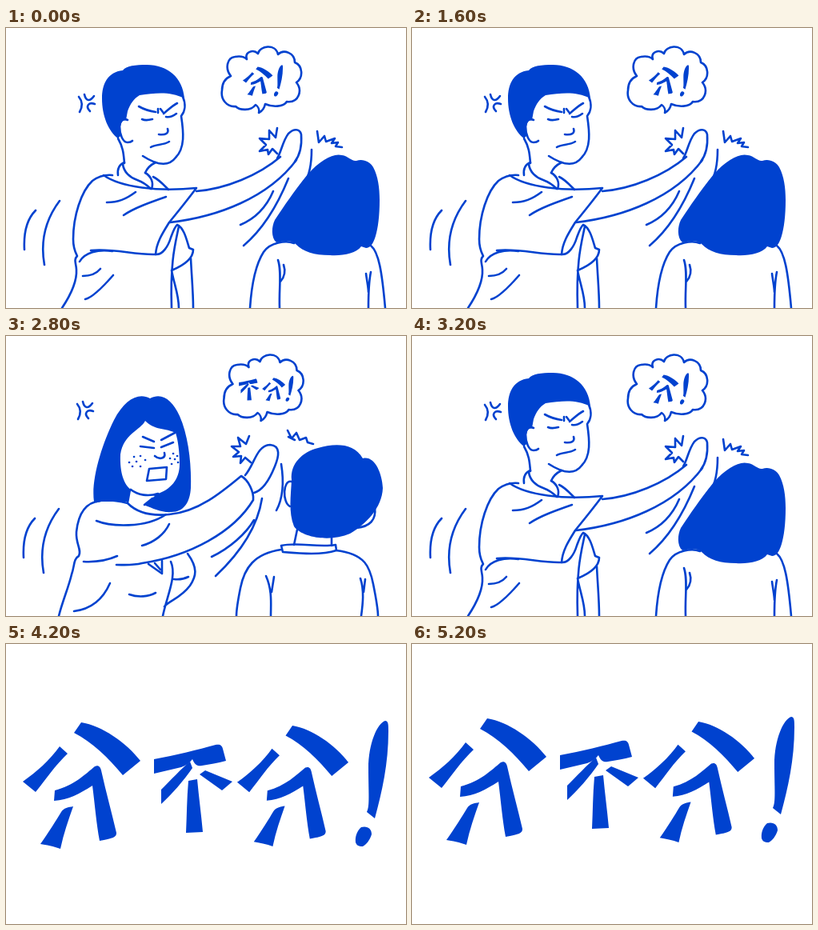
Animation of 500 by 350 pixels, one loop 8.2 s. Source, as an HTML page:

```html
<!DOCTYPE html>
<html lang="zh">
<head>
<meta charset="utf-8">
<title>分不分!</title>
<style>
  html, body { margin: 0; width: 100%; height: 100%; overflow: hidden; background: #fff; }
  svg { display: block; width: 100vw; height: 100vh; }
  .line { fill: none; stroke: #0042cf; stroke-width: 2.6; stroke-linecap: round; stroke-linejoin: round; }
  .ink { fill: #0042cf; stroke: none; }
  .paper { fill: #fff; stroke: none; }
  #woman, #title { opacity: 0; }
  #title { transform-origin: 249.5px 171px; }
</style>
</head>
<body>
<svg viewBox="0 0 500 350" role="img" aria-label="分不分!">
  <defs>
    <g id="fen" class="ink">
      <path d="M94 93C120 97 150 118 168 141L146 159C128 137 108 118 85 106Z"/>
      <path d="M67 123L77 132C62 146 50 164 37 180L21 167C38 155 55 140 67 123Z"/>
      <path d="M61 178C85 172 100 157 111 148C116 146 118 149 119 153C125 180 132 205 138 231C138 237 133 238 117 241C113 220 111 195 108 172C92 182 78 190 60 191Z"/>
      <path d="M84 198C78 215 72 232 68 251C60 248 50 246 43 245C53 231 63 215 69 205C72 200 78 199 84 198Z"/>
    </g>
    <g id="bu" class="ink">
      <path d="M185 139C212 134 240 127 262 121C268 120 270 122 271 126L275 141C264 144 255 145 245 147C239 148 236 146 233 139C229 144 225 147 219 149L185 157Z"/>
      <path d="M194 177C206 165 219 151 230 142L233 150C222 166 208 182 194 195Z"/>
      <path d="M228 166L239 164C241 186 244 208 246 230L225 231C226 210 226 188 228 166Z"/>
      <path d="M249 153L283 167L270 178L242 158Z"/>
    </g>
    <g id="bang" class="ink">
      <path d="M474 91C478 91 478 96 478 104C478 145 470 180 461 213L451 205C455 198 453 180 453 150C453 120 464 94 474 91Z"/>
      <path d="M444 224C452 222 457 226 457 233C455 240 450 246 446 248C440 248 438 246 437 243C436 236 439 228 444 224Z"/>
    </g>
    <path id="cloud" class="line" d="M281 60C273 50 277 37 286 36C292 35 298 36 301 39C298 30 309 26 315 32C317 22 337 19 340 33C347 26 361 31 361 43C371 47 372 62 363 68C371 78 366 94 351 92C347 99 333 99 324 95C323 100 320 104 316 106C317 102 315 98 312 96C306 104 292 103 287 98C276 99 268 89 270 78C270 69 274 63 281 60Z"/>
    <path id="swoosh" class="line" d="M37 228C25 240 22 258 23 277M67 216C49 240 43 268 48 296"/>
    <path id="vein" class="line" d="M91 86C96 92 96 98 92 105M98 83C100 92 105 92 110 85M111 95C103 92 99 98 105 104"/>
  </defs>

  <g id="man">
    <path class="ink" d="M140 138C128 129 120 110 120 88C120 70 127 55 146 53C150 47 162 46 176 46C202 46 221 62 223 88C205 79 188 81 167 84C160 88 155 95 152 104L150 115C143 115 142 124 143 135Z"/>
    <g class="line">
      <path d="M152 115C146 112 142 117 142 123C142 133 146 143 152 143C155 143 157 142 158 141"/>
      <path d="M221 86C225 95 224 104 219 110C222 130 224 150 212 162C203 174 188 171 171 160"/>
      <path d="M166 98C173 102 180 104 187 105M214 94C208 97 203 102 197 107M190 101V106M193 101L196 105M170 114C174 116 179 115 183 114M200 111C204 112 209 110 213 107"/>
      <path d="M202 126C204 132 199 134 191 133M181 149C187 145 196 147 204 142"/>
      <path d="M140 138C147 150 147 159 148 169M187 168C181 171 176 176 174 181"/>
      <path d="M148 168C141 171 139 177 140 184M146 170C147 180 155 187 164 190C172 193 177 197 181 201M174 181C181 185 185 193 182 201M184 186C192 190 197 196 203 202"/>
      <path d="M133 184C123 183 115 186 108 191C94 204 84 235 84 264C84 276 87 281 89 285C84 290 88 295 88 302C89 318 80 335 70 350"/>
      <path d="M122 184C143 199 190 205 238 200C226 216 213 232 204 243C196 256 188 268 187 283C196 284 203 272 206 262C209 254 211 248 214 246"/>
      <path d="M92 292C98 281 115 276 133 279M106 278C135 275 160 284 187 283"/>
      <path d="M126 218C140 218 150 214 162 205M147 234C160 225 180 218 200 211M96 310C105 310 113 307 118 301M99 339C108 337 120 325 134 309"/>
      <path d="M238 204C275 201 316 184 343 161M205 243C265 236 328 212 363 165"/>
      <path d="M339 163C344 155 346 141 353 132C359 126 367 125 369 133C370 147 368 158 361 167"/>
      <path d="M214 246C223 250 226 266 229 275L234 277C234 289 219 298 207 303C210 320 216 333 216 350M216 248C212 268 205 290 207 350M231 288C232 310 234 330 234 350"/>
      <path d="M339 125L337 137L329 128L329 139L317 138L325 146L317 154L327 152L328 158L333 151L339 157"/>
      <path d="M389 129L391 143L398 135L400 142L411 138L407 144L415 143L412 148L420 149"/>
      <path d="M382 152C382 172 378 186 373 194M353 188C340 220 323 250 297 272M334 204C325 225 312 238 293 246"/>
    </g>
    <path class="ink" d="M338 268C331 262 332 248 336 240C348 222 360 204 377 183C393 165 409 156 420 159C428 160 432 167 438 166C446 163 455 167 459 174C465 185 467 200 467 215C467 235 465 250 462 260C459 270 455 275 450 275L444 273C438 282 420 285 405 284C385 284 372 280 362 270C356 264 346 267 338 268Z"/>
    <path class="line" d="M360 269C350 265 330 268 322 280C313 294 307 320 305 350M340 290C345 305 341 325 342 350M347 296Q351 308 343 317M456 272C466 280 470 305 474 350M450 307C451 315 453 325 453 330M456 305C453 320 453 335 453 350"/>
    <use href="#swoosh"/><use href="#vein"/><use href="#cloud"/>
    <use href="#fen" transform="translate(290.6 27) scale(.255 .23)"/>
    <use href="#bang" transform="translate(217 23.5) scale(.27 .25)"/>
  </g>

  <g id="woman">
    <path class="ink" d="M110 207C106 180 120 135 135 105C148 80 165 70 180 78C195 70 208 80 217 100C228 125 232 160 231 190C230 208 222 220 207 220C195 221 185 216 172 211L152 207Z"/>
    <path class="paper" d="M155 188L152 210L172 212L186 200Z"/>
    <path class="paper" d="M174 106C168 118 147 122 143 148C142 172 148 186 156 192C165 199 180 200 190 197C205 192 217 180 217 160C217 145 215 130 212 121C200 115 185 118 174 106Z"/>
    <g class="line">
      <path d="M156 192C165 199 178 201 190 197M155 192L152 208M183 203L173 211"/>
      <path d="M171 126L185 132M168 138L185 140M194 130L211 121M194 139L209 133M198 146C200 153 192 155 186 150M179 166L201 164L200 179L176 181Z"/>
      <path d="M154 158h.1M160 151h.1M158 163h.1M163 157h.1M168 150h.1M168 163h.1M174 155h.1M205 153h.1M209 147h.1M211 154h.1M207 160h.1M214 150h.1M215 158h.1"/>
      <path d="M118 206C98 208 90 225 88 245C87 260 95 267 91 275C84 279 86 287 82 298C78 315 71 330 66 350"/>
      <path d="M113 207C125 203 140 206 152 209C165 222 185 225 204 223C240 220 270 195 294 175C303 180 310 195 309 205C285 245 230 275 170 284C158 287 148 286 138 286"/>
      <path d="M97 282C115 283 130 279 139 275M113 231C130 238 174 241 200 223M170 262C185 258 198 248 204 235"/>
      <path d="M299 174C311 160 313 137 330 136C344 137 341 151 336 163C330 178 321 193 310 196"/>
      <path d="M130 309C123 325 110 341 85 344M154 323C165 327 178 326 187 321"/>
      <path d="M227 272C240 290 238 300 230 312C218 328 205 330 198 338M206 282C214 300 201 325 196 350M210 304Q220 305 228 301M178 285L195 297V281M186 284L193 292"/>
      <path d="M304 125L300 135L290 127L293 138L282 138L291 145L284 151L294 150L293 159L299 152L306 158"/>
      <path d="M352 118L357 128L363 121L367 130L375 127L377 133L384 135M353 126L361 130"/>
      <path d="M344 160C348 185 345 205 338 218M320 203C315 235 295 269 262 300M310 230C300 247 280 265 257 276"/>
      <path d="M357 182C346 179 345 208 355 213M461 214C463 230 455 238 438 240M364 242L360 261M407 252V262"/>
      <path d="M344 262C365 257 390 265 412 261L413 268C395 274 370 272 346 270ZM344 267C310 272 298 290 293 315C289 335 288 342 288 350M412 268C450 272 455 290 459 310C464 335 465 342 465 350"/>
      <path d="M325 300C333 318 331 335 331 350M335 301L332 320M443 303C448 318 446 335 444 350M449 304L447 320"/>
    </g>
    <path class="ink" d="M357 180C355 160 370 145 390 140C410 134 435 133 446 153C460 149 470 170 471 190C470 215 450 235 430 247C405 258 370 252 360 238C353 220 356 200 357 180Z"/>
    <use href="#swoosh" transform="translate(-1 0)"/>
    <use href="#vein" transform="translate(-2 -1)"/>
    <use href="#cloud" transform="translate(2.5 0)"/>
    <use href="#bu" transform="translate(243 24) scale(.26 .245)"/>
    <use href="#fen" transform="translate(316 35) scale(.197 .185)"/>
    <use href="#bang" transform="translate(246 31) scale(.237 .205)"/>
  </g>

  <g id="title">
    <use href="#fen"/>
    <use href="#bu"/>
    <use href="#fen" transform="translate(269.1 8.1) scale(.946 .956)"/>
    <use href="#bang"/>
  </g>
</svg>
<script>
  const LOOP = 8200, BEAT = 400, CURTAIN = 4200;

  // Holds each value until the next [ms, value] step.
  function hold(id, prop, steps) {
    const frames = steps.map(([ms, value]) => ({ offset: ms / LOOP, [prop]: value, easing: 'steps(1, end)' }));
    frames.push({ offset: 1, [prop]: steps[steps.length - 1][1] });
    document.getElementById(id).animate(frames, { duration: LOOP, iterations: Infinity }).startTime = 0;
  }

  const pose = (x, y, size = 1) => `translate(${x}px, ${y}px) scale(${size})`;

  const man = [], woman = [];
  for (let ms = 0, beat = 0; ms < CURTAIN; ms += BEAT, beat++) {
    man.push([ms, 1 - beat % 2]);
    woman.push([ms, beat % 2]);
  }
  man.push([CURTAIN, 0]);
  woman.push([CURTAIN, 0]);

  hold('man', 'opacity', man);
  hold('woman', 'opacity', woman);
  hold('title', 'opacity', [[0, 0], [3600, 1]]);
  hold('title', 'transform', [
    [0, pose(3.5, -199)],
    [4000, pose(0, 5)],
    [4400, pose(0, 0)],
    [4800, pose(0, 0, .965)],
    [5000, pose(0, 0, .93)],
    [5200, pose(0, 0)]
  ]);
</script>
</body>
</html>
```
